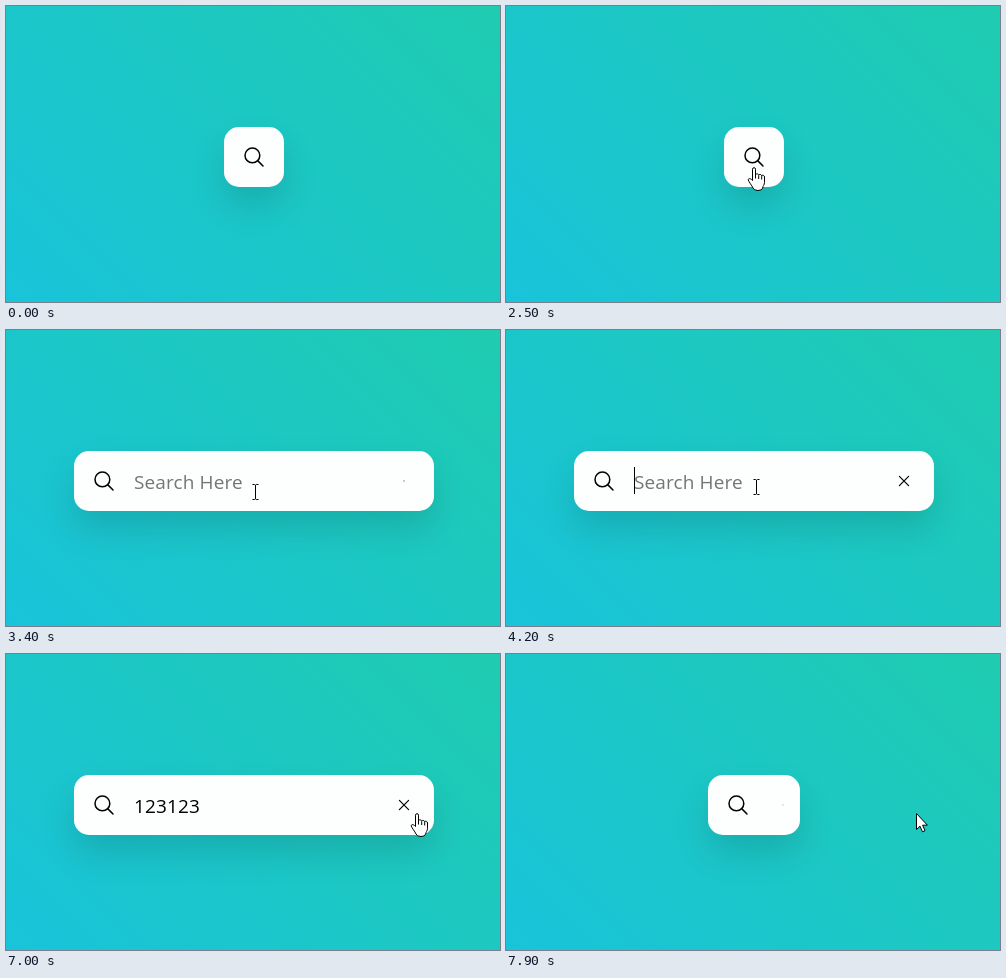
These frames come from a looping animation (494 px wide and 296 px high, 8 s). An HTML page:

```html
<!DOCTYPE html>
<html lang="en">
<head>
<meta charset="utf-8">
<title>Expanding search box</title>
<style>
  html, body { margin: 0; width: 100%; height: 100%; overflow: hidden; }
  #stage {
    position: relative; width: 494px; height: 296px; overflow: hidden;
    background: linear-gradient(45deg, #19c3da, #1fccb0);
  }
  #box {
    position: absolute; top: 121px; height: 60px;
    background: #fdfefe; border-radius: 15px;
    box-shadow: 0 18px 35px rgba(0, 0, 0, .13);
  }
  #input {
    position: absolute; left: 60px; top: 0; height: 60px;
    display: flex; overflow: hidden; white-space: pre;
    font: 19px/62px "Open Sans", "Noto Sans", sans-serif;
    letter-spacing: .13px; color: #000;
  }
  #input span { flex: none; }
  #hint { color: #757575; }
  #caret { flex: none; width: 1px; height: 27px; margin: 16px -1px 0 0; background: #000; }
  svg { position: absolute; overflow: visible; }
  .icon { top: 18px; width: 24px; height: 24px; fill: none; stroke: #000; stroke-width: 1.5; stroke-linecap: round; }
  #search { left: 18px; }
  #close { stroke-width: 1.2; }
  #cursor { left: 0; top: 0; width: 1px; height: 1px; fill: #fff; stroke: #000; stroke-linejoin: round; }
</style>
</head>
<body>
<div id="stage">
  <div id="box">
    <svg id="search" class="icon"><circle cx="10.4" cy="10.4" r="7.4"/><path d="M15.9 15.9L21 21"/></svg>
    <div id="input"><span id="typed"></span><i id="caret"></i><span id="hint">Search Here</span></div>
    <svg id="close" class="icon"><path d="M7.4 7.4L16.6 16.6M16.6 7.4L7.4 16.6"/></svg>
  </div>
  <svg id="cursor">
    <path id="arrow" d="M.5 .5V16.5L4 13.2L6.5 18.8L9 17.7L6.6 12.2H11.4Z"/>
    <g id="hand" transform="translate(1 .5)">
      <path d="M-1.5 13V1.7a1.5 1.5 0 0 1 3 0V7.5c0-1.6 3.2-1.6 3.2 .3c0-1.4 3-1.2 3 .7c.2-1.2 2.8-1 2.8 1V15c0 2.5-1.8 3.5-1.8 5.5Q8 23 4 23Q0 23-1 20.5C-2 18-5.2 14.5-5.7 12.5c-.3-1.9 2.2-2 4.2 .5Z"/>
      <path fill="none" d="M1.5 7.5V11M4.7 8V11.5M7.7 8.6V12"/>
    </g>
    <path id="beam" fill="none" d="M-3 -7.5H-1L0 -6.8L1 -7.5H3M0 -7V7M-3 7.5H-1L0 6.8L1 7.5H3"/>
  </svg>
</div>
<script>
const LOOP = 8000, STEP = 100, MOVE = 500, BLINK = 530;
const ENTER = 1400, OPEN = 2828, FOCUS = 4180, TYPE = 4950, SHUT = 7595;
const CENTER = 248, SMALL = 60, WIDE = 360;
const WORD = "123123";

// pointer strokes: when each one ends, how long it takes and where it leads
const strokes = [
  { end: 1800, time: 400, x: 303, y: 146 },
  { end: 2200, time: 400, x: 277, y: 104 },
  { end: 2500, time: 300, x: 247, y: 161 },
  { end: 3000, time: 200, x: 249, y: 162 },
  { end: 4200, time: 200, x: 250, y: 157 },
  { end: 6800, time: 400, x: 410, y: 159 }
];

const $ = id => document.getElementById(id);
const show = (id, on) => { $(id).style.display = on ? "" : "none"; };
const clamp = v => Math.min(1, Math.max(0, v));
const smooth = v => v * v * (3 - 2 * v);

// cubic-bezier(.25, .1, .25, 1)
function ease(x) {
  let lo = 0, hi = 1;
  const curve = (s, a, b) => 3 * a * s * (1 - s) ** 2 + 3 * b * s * s * (1 - s) + s ** 3;
  for (let i = 0; i < 24; i++) {
    const mid = (lo + hi) / 2;
    if (curve(mid, .25, .25) < x) lo = mid; else hi = mid;
  }
  return curve(lo, .1, 1);
}
const tween = (t, start) => ease(clamp((t - start) / MOVE));

function pointer(t) {
  let x = 28, y = 165;
  for (const s of strokes) {
    const f = smooth(clamp(1 - (s.end - t) / s.time));
    x += (s.x - x) * f;
    y += (s.y - y) * f;
  }
  return [x, y];
}

function drawCursor(t, left, right) {
  const [x, y] = pointer(t);
  const inside = x >= left && x <= right && y >= 121 && y <= 181;
  let kind = !inside ? "arrow" : x > left + 60 && x < right - 42 ? "beam" : "hand";
  if (t < ENTER) kind = "";
  const snap = kind === "beam" ? .5 : 0;
  $("cursor").style.transform = `translate(${Math.round(x) + snap}px, ${Math.round(y)}px)`;
  for (const id of ["arrow", "hand", "beam"]) show(id, id === kind);
}

// two quick bursts of three keys
const keyTime = i => TYPE + 300 * Math.floor(i / 3) + 55 * (i % 3);

function drawText(t) {
  let count = 0;
  while (count < WORD.length && keyTime(count) <= t) count++;
  const wake = count ? keyTime(count - 1) : FOCUS;
  const focused = t >= FOCUS && t < SHUT;
  const text = t < SHUT ? WORD.slice(0, count) : "";
  $("typed").textContent = text;
  show("hint", !text);
  show("caret", focused && Math.floor((t - wake) / BLINK) % 2 === 0);
}

function draw(t) {
  const shut = tween(t, SHUT);
  const w = Math.round(SMALL + (WIDE - SMALL) * (tween(t, OPEN) - shut));
  const left = Math.floor(CENTER - w / 2);
  $("box").style.left = left + "px";
  $("box").style.width = w + "px";
  $("input").style.width = Math.max(0, w - 93) + "px";

  // the cross grows once the box is open and shrinks along with it
  const scale = tween(t, OPEN + MOVE) - shut;
  show("close", scale > .01);
  $("close").style.left = w - 42 + (WIDE - w) / 20 + "px";
  $("close").style.transform = `scale(${scale})`;

  drawText(t);
  drawCursor(t, left, left + w);
}

const begin = performance.now();
function tick() {
  const t = (performance.now() - begin) % LOOP;
  draw(Math.floor(t / STEP) * STEP);
  requestAnimationFrame(tick);
}
draw(0);
requestAnimationFrame(tick);
</script>
</body>
</html>
```
